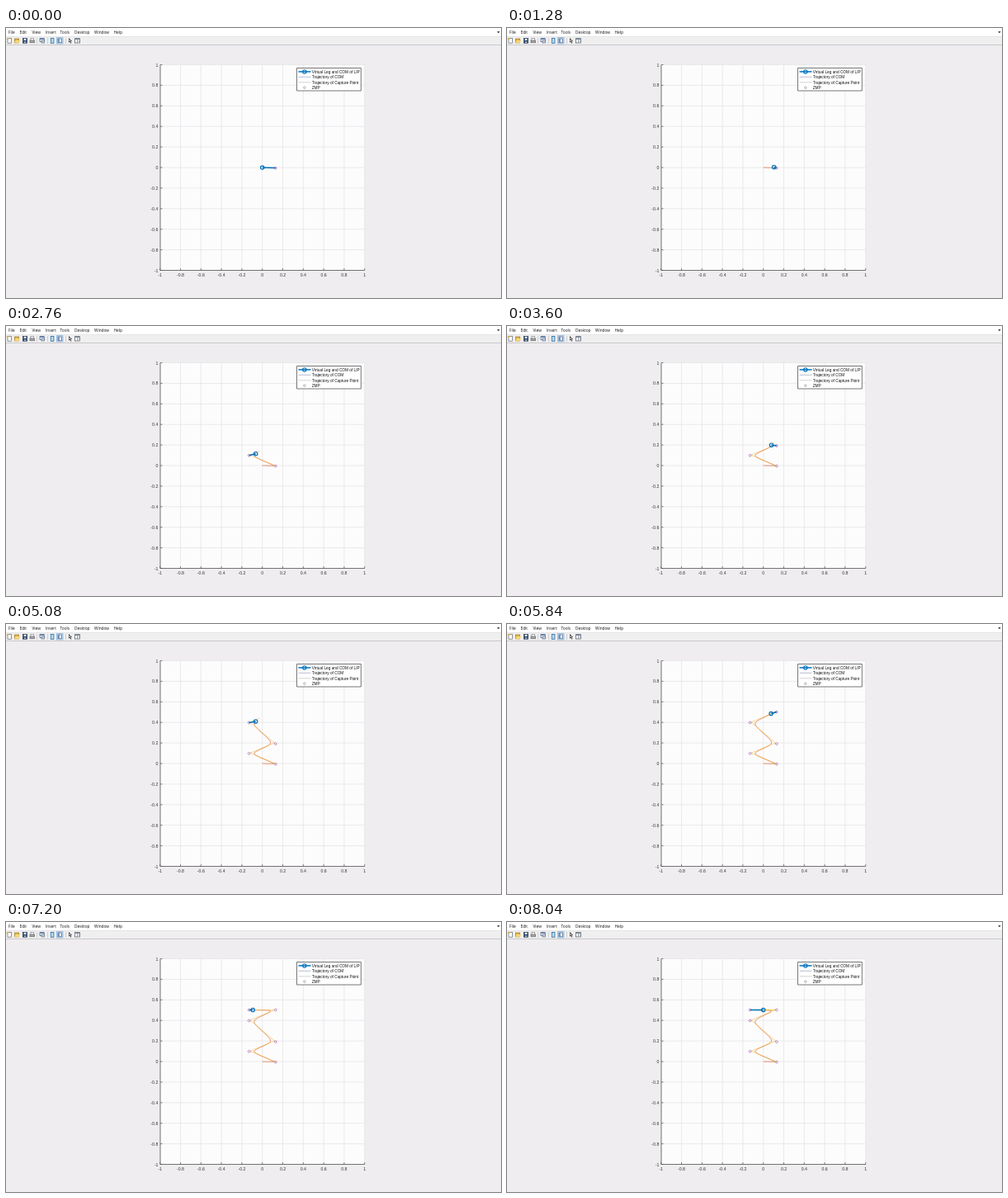
An HTML page with a canvas that plays this animation: 600 px wide and 327 px high, repeating every 8120 ms.

```html
<!DOCTYPE html>
<html lang="en">
<head>
<meta charset="utf-8">
<title>Walking pendulum</title>
<style>
html, body { margin: 0; width: 100%; height: 100%; overflow: hidden; background: #efedef; }
canvas { display: block; width: 600px; height: 327px; }
</style>
</head>
<body>
<canvas id="stage" width="600" height="327"></canvas>
<script>
const W = 600, H = 327, LOOP = 8120, TICK = 40;
const ctx = document.getElementById('stage').getContext('2d');
const BLUE = '#0072bd', ORANGE = '#d95319', YELLOW = '#edb120', PURPLE = '#7e2f8e';
const INK = '#333';
const SANS = '"Liberation Sans", Arial, sans-serif';
const MENU = '"Open Sans", "Noto Sans", sans-serif';

// Plot coordinates to pixels
const px = x => 310.7 + x * 124;
const py = y => 169 - y * 124.5;

// Linear inverted pendulum: planned footholds and step durations
const OMEGA = 0.00276;
const steps = [
  [0.13, -0.005, 1910], [-0.13, 0.098, 1160], [0.13, 0.192, 1160],
  [-0.13, 0.398, 1160], [0.13, 0.502, 1160], [-0.13, 0.502, 1400]
].map(([x, y, time]) => ({ foot: [x, y], time }));

function plan() {
  // Capture points backwards from the goal, then mass positions forwards
  let cp = [0.125, 0.502];
  for (const s of [...steps].reverse()) {
    const k = Math.exp(-OMEGA * s.time);
    cp = s.cp = s.foot.map((f, i) => f + (cp[i] - f) * k);
  }
  let com = [0, 0], start = 0;
  for (const s of steps) {
    s.start = start;
    s.com = com;
    com = massAt(s, s.time);
    start += s.time;
  }
  return start;
}

function massAt(s, t) {
  const a = OMEGA * t;
  return s.foot.map((f, i) =>
    f + (s.com[i] - f) * Math.exp(-a) + (s.cp[i] - f) * Math.sinh(a));
}

function captureAt(s, t) {
  const k = Math.exp(OMEGA * t);
  return s.foot.map((f, i) => f + (s.cp[i] - f) * k);
}

const END = plan();

function stepAt(t) {
  let n = 0;
  while (n < steps.length - 1 && t >= steps[n + 1].start) n++;
  return n;
}

// Drawing helpers
function line(g, x1, y1, x2, y2, color, width = 1) {
  g.strokeStyle = color;
  g.lineWidth = width;
  g.beginPath();
  g.moveTo(x1, y1);
  g.lineTo(x2, y2);
  g.stroke();
}

function ring(g, x, y, r, color, width) {
  g.strokeStyle = color;
  g.lineWidth = width;
  g.beginPath();
  g.arc(x, y, r, 0, 7);
  g.stroke();
}

function box(g, x, y, w, h, fill, edge, width = 0.7) {
  g.fillStyle = fill;
  g.fillRect(x, y, w, h);
  if (edge) {
    g.strokeStyle = edge;
    g.lineWidth = width;
    g.strokeRect(x, y, w, h);
  }
}

function poly(g, points, fill) {
  g.fillStyle = fill;
  g.beginPath();
  points.forEach(([x, y]) => g.lineTo(x, y));
  g.fill();
}

function label(g, text, x, y, size, align = 'left', family = SANS, color = INK) {
  g.font = size + 'px ' + family;
  g.textAlign = align;
  g.fillStyle = color;
  g.fillText(text, x, y);
}

function drawMenu(g) {
  box(g, 0, 0, W, 10, '#fff');
  const items = { File: 3, Edit: 16.5, View: 31.5, Insert: 48, Tools: 65.5, Desktop: 83, Window: 107, Help: 130.5 };
  for (const name in items) label(g, name, items[name], 6.9, 4.8, 'left', MENU, '#111');
  poly(g, [[595.2, 4.2], [598.6, 4.2], [596.9, 6.2]], '#222');
}

function drawToolbar(g) {
  box(g, 0, 10, W, 10.5, '#f0eff0');
  line(g, 0, 10.5, W, 10.5, '#e6e5e6');
  line(g, 0, 20.5, W, 20.5, '#c9c8ca');
  for (const x of [37.5, 50.5, 72.5]) line(g, x, 12, x, 19, '#c2c2c4', 0.7);

  // New, open
  box(g, 2, 12.6, 4.6, 5.6, '#fff', '#62666e');
  poly(g, [[0.8, 12], [3, 12], [3, 14], [0.8, 14]], '#d8b04a');
  box(g, 10.3, 13, 5.4, 5, '#dfb343', '#94752b', 0.6);
  poly(g, [[11.5, 15], [17, 15], [15.6, 18.2], [10.2, 18.2]], '#f5d774');
  // Save, print
  box(g, 20.5, 12.6, 5, 5.6, '#36506f', '#24364f');
  box(g, 21.7, 12.8, 2.7, 2.2, '#dde6ee');
  box(g, 22, 16.4, 2.2, 1.6, '#aab8c7');
  box(g, 30, 12.3, 3.4, 3, '#fff', '#74777c', 0.6);
  box(g, 29, 15, 5.6, 2.8, '#aaa9a8', '#55585c', 0.6);
  // Preview
  box(g, 41, 12.7, 5.2, 3.6, '#fff', '#3e587e');
  box(g, 41, 12.5, 5.2, 1.3, '#5273a2');
  box(g, 43, 15, 3.6, 3, '#ccd5e2', '#445978', 0.6);
  // Page toggles
  box(g, 54.3, 12.5, 3.6, 5.8, '#b8dcf2', '#286c9e', 0.8);
  box(g, 61.4, 11.7, 7.6, 7.3, '#cfe3f5', '#83b0d8');
  box(g, 63, 13, 4.6, 4.8, '#fff', '#3e587e');
  box(g, 63, 13, 1.8, 4.8, '#6d8bb5');
  // Pointer
  poly(g, [[76, 12], [76, 17.8], [77.4, 16.6], [78.5, 18.8], [79.3, 18.3], [78.3, 16.2], [80, 16.1]], '#333');
  poly(g, [[76.7, 13.6], [76.7, 16.2], [78.4, 15.5]], '#fff');
  // Inspector
  box(g, 83.5, 12.8, 6, 5.2, '#fff', '#4b5360');
  box(g, 83.5, 12.6, 6, 1.3, '#6c7888');
  line(g, 86.5, 14, 86.5, 18, '#6c7888', 0.6);
  line(g, 87, 15.9, 89.2, 15.9, '#6c7888', 0.6);
}

function drawAxes(g) {
  const left = 187, right = 434.7, top = 44.5, bottom = 293.5;
  box(g, left, top, right - left, bottom - top, '#fdfcfd');
  for (let i = -5; i <= 5; i++) {
    const x = px(i / 5), y = py(i / 5);
    line(g, x, top, x, bottom, '#e5e4e6', 0.8);
    line(g, left, y, right, y, '#e5e4e6', 0.8);
  }
  line(g, left, top, left, bottom, '#555', 0.8);
  line(g, left, bottom, right, bottom, '#555', 0.8);
  for (let i = -5; i <= 5; i++) {
    const x = px(i / 5), y = py(i / 5), text = String(i / 5);
    line(g, x, bottom, x, bottom - 2.5, '#555', 0.7);
    line(g, left, y, left + 2.5, y, '#555', 0.7);
    label(g, text, x, 301, 5.2, 'center');
    label(g, text, 184.3, y + 2, 5.2, 'right');
  }
}

function drawLegend(g) {
  box(g, 352.5, 48.5, 77.8, 27.5, '#fff', '#555', 0.8);
  line(g, 354.5, 52.9, 369.5, 52.9, BLUE, 1.5);
  ring(g, 361.8, 52.9, 2.2, BLUE, 1.1);
  line(g, 354.5, 59.3, 369.5, 59.3, '#a5abc3', 0.8);
  line(g, 354.5, 65.8, 369.5, 65.8, '#cac6cb', 0.8);
  ring(g, 361.8, 72.2, 1.3, '#8b7b92', 0.6);
  ['Virtual Leg and COM of LIP', 'Trajectory of COM', 'Trajectory of Capture Point', 'ZMP']
    .forEach((text, i) => label(g, text, 370.7, 54.7 + i * 6.45, 4.75, 'left', SANS, '#111'));
}

function makeBackdrop() {
  const layer = document.createElement('canvas');
  layer.width = W;
  layer.height = H;
  const g = layer.getContext('2d');
  box(g, 0, 0, W, H, '#efedef');
  drawMenu(g);
  drawToolbar(g);
  drawAxes(g);
  return layer;
}

function trail(at, until, color, width) {
  ctx.strokeStyle = color;
  ctx.lineWidth = width;
  ctx.beginPath();
  for (let t = 0; t <= until; t += 10) {
    const s = steps[stepAt(t)], [x, y] = at(s, t - s.start);
    ctx.lineTo(px(x), py(y));
  }
  ctx.stroke();
}

const backdrop = makeBackdrop();
ctx.lineJoin = 'round';

function draw(time) {
  const t = Math.min(time, END), n = stepAt(t), s = steps[n];
  const [mx, my] = massAt(s, t - s.start), [fx, fy] = s.foot;
  ctx.drawImage(backdrop, 0, 0);

  ctx.globalAlpha = 0.85;
  trail(massAt, t, ORANGE, 0.8);
  ctx.globalAlpha = 0.75;
  trail(captureAt, t, YELLOW, 0.7);
  ctx.globalAlpha = 1;

  line(ctx, px(mx), py(my), px(fx), py(fy), BLUE, 1.5);
  ring(ctx, px(mx), py(my), 2.2, BLUE, 1.2);
  ctx.globalAlpha = 0.8;
  for (const { foot: [x, y] } of steps.slice(0, n + 1)) ring(ctx, px(x), py(y), 1.4, PURPLE, 0.6);
  ctx.globalAlpha = 1;
  drawLegend(ctx);
}

const begin = performance.now();
function frame(now) {
  const t = Math.max(0, now - begin) % LOOP;
  draw(Math.min(Math.floor(t / TICK) * TICK, LOOP - 2 * TICK));
  requestAnimationFrame(frame);
}
draw(0);
requestAnimationFrame(frame);
</script>
</body>
</html>
```
